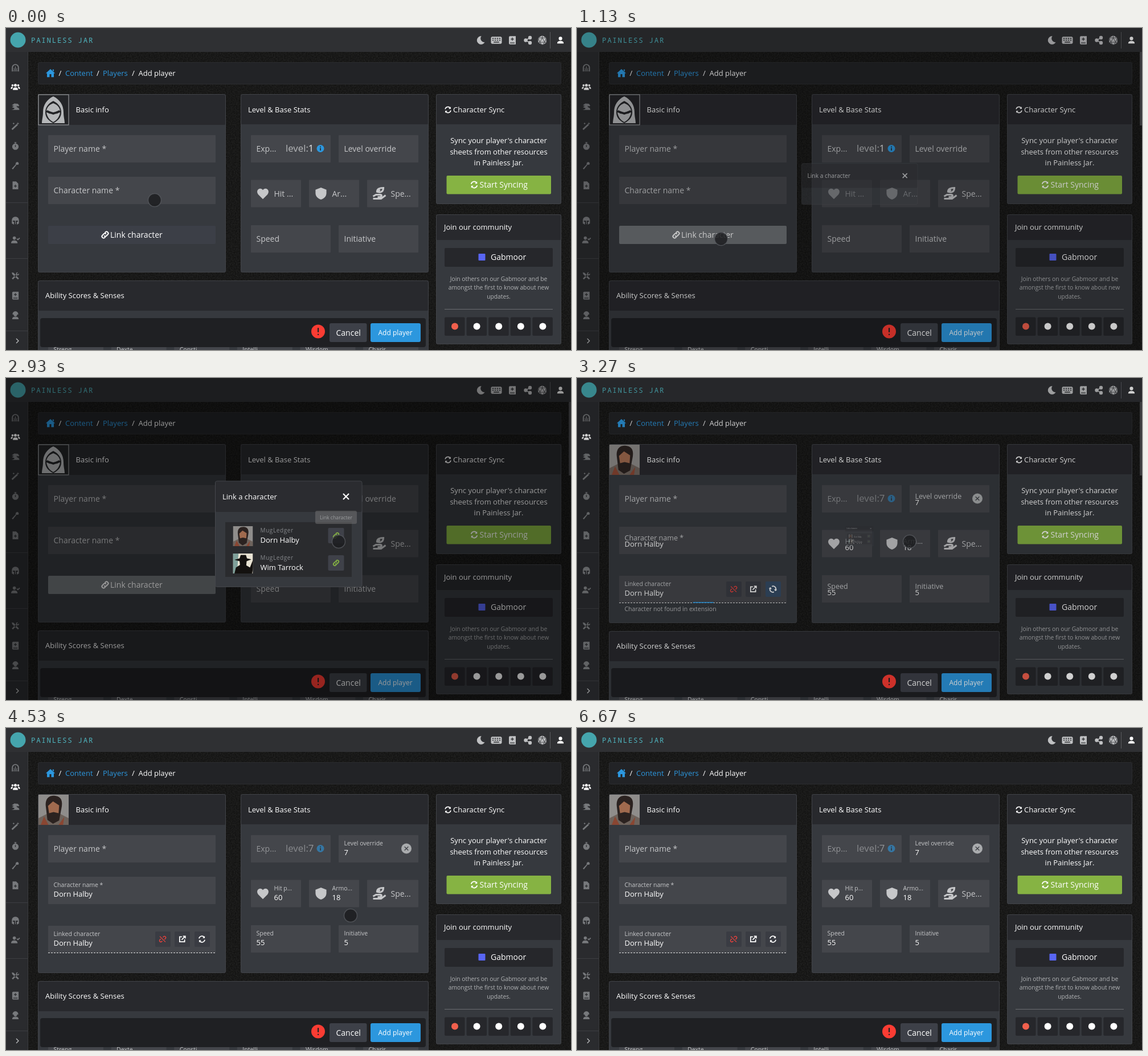
These frames come from a looping animation (992 px wide and 565 px high, 7.54 s). An HTML page:

```html
<!DOCTYPE html>
<html lang="en">
<head>
<meta charset="utf-8">
<title>Add player</title>
<style>
html, body { margin: 0; height: 100%; overflow: hidden; background: #191a19; }
svg { display: block; width: 100vw; height: 100vh; font-family: "Open Sans", sans-serif; }
text { white-space: pre; }
</style>
</head>
<body>
<svg id="stage" viewBox="0 0 992 565"></svg>
<script>
const LOOP = 7540, OPEN = 1050, LOADED = 1190, LINKED = 3110;
const BLUE = '#2c97de', SOFT = '#c6c7c9', PANEL = '#36393e', HEAD = '#28292d', FIELD = '#44464b', DARK = '#26272b';
const HERO = 'Dorn Halby', RIVAL = 'Wim Tarrock', SITE = 'MugLedger';

const box = (x, y, w, h, fill, r = 0, more = '') =>
  `<rect x="${x}" y="${y}" width="${w}" height="${h}" rx="${r}" fill="${fill}" ${more}/>`;
const dot = (x, y, r, fill) => `<circle cx="${x}" cy="${y}" r="${r}" fill="${fill}"/>`;
const text = (x, y, s, size = 13, fill = '#fff', more = '') =>
  `<text x="${x}" y="${y}" font-size="${size}" fill="${fill}" ${more}>${s}</text>`;
const mid = (x, y, s, size, fill) => text(x, y, s, size, fill, 'text-anchor="middle"');
const line = (x1, y1, x2, y2, color, more = '') =>
  `<path d="M${x1} ${y1}L${x2} ${y2}" stroke="${color}" ${more}/>`;

// Icons live on a 24 unit grid; names in STROKED hold the pen width.
const ICON = {
  home: 'M10 21v-7h4v7h6v-9h3L12 2 1 12h3v9zM17 3h3v5l-3-3z',
  link: 'M9 14a4.500 4.500 0 0 0 7 1l4-4a4.700 4.700 0 0 0-7-7l-2 2M15 10a4.500 4.500 0 0 0-7-1l-4 4a4.700 4.700 0 0 0 7 7l2-2',
  unlink: 'M13 6l2-2a4 4 0 0 1 6 6l-3 3M11 18l-2 2a4 4 0 0 1-6-6l3-3M3 3l18 18',
  sync: 'M3 10a9 9 0 0 1 16-4M21 14a9 9 0 0 1-16 4M21 2v7h-7zM3 22v-7h7z',
  open: 'M11 5H4v15h15v-7M14 3h7v7M20 4L10 14',
  heart: 'M12 22L3 13C-1 8 2 2 7 2c2 0 4 1 5 3 1-2 3-3 5-3 5 0 8 6 4 11z',
  shield: 'M12 1L2 5v6c0 6 4 10 10 12 6-2 10-6 10-12V5z',
  hand: 'M1 21h14l8-6M1 17l5-3h8c3 0 2 4-1 4H9M8 9c0-5 4-7 11-7 0 6-4 9-10 7l4-4',
  moon: 'M13 1a11 11 0 1 0 9 16A10 10 0 0 1 13 1z',
  keys: 'M2 4h20l2 2v12l-2 2H2l-2-2V6zM3 7v2h3V7zM8 7v2h3V7zM13 7v2h3V7zM18 7v2h3V7zM3 11v2h3v-2zM8 11v2h3v-2zM13 11v2h3v-2zM18 11v2h3v-2zM6 15v2h12v-2z',
  book: 'M6 1h15v22H6a3 3 0 0 1-3-3V4a3 3 0 0 1 3-3zM6 18v2h12v-2zM11 5v3H8v2h3v3h2v-3h3V8h-3V5z',
  share: 'M18 5L6 12l12 7',
  die: 'M12 0l10 6v12l-10 6L2 18V6z',
  dieEdges: 'M12 0v6L2 6l4 11L12 6l6 11H6L2 18l10 6-6-7m16 1l-4-1-6 7m6-7l4-11L12 6',
  user: 'M12 12a5.500 5.500 0 1 0 0-11 5.500 5.500 0 0 0 0 11zM2 22c0-6 4-8 10-8s10 2 10 8z',
  users: 'M12 12a4 4 0 1 0 0-8 4 4 0 0 0 0 8zM5 21c0-6 3-7 7-7s7 1 7 7zM4 11a3 3 0 1 0 0-6 3 3 0 0 0 0 6zM-1 18c0-5 2-6 6-6l-2 6zM20 11a3 3 0 1 0 0-6 3 3 0 0 0 0 6zM25 18c0-5-2-6-6-6l2 6z',
  gate: 'M2 22V11a10 10 0 0 1 20 0v11h-3V11a7 7 0 0 0-14 0v11zM7 22v-9h2v9zM15 22v-9h2v9zM11 22V8h2v14zM7 15h10v2H7z',
  dragon: 'M2 8l7-5 10 1 4 5-3 2-5-1 2 4c4 1 6 3 6 7H1c5-1 9-2 8-5L2 13l6-3z',
  wand: 'M1 20L16 6l3 3L4 23zM19 1l1 3 3 1-3 1-1 3-1-3-3-1 3-1zM7 2l1 2 2 1-2 1-1 2-1-2-2-1 2-1z',
  watch: 'M9 1h6v2h-2v2a9 9 0 1 1-2 0V3H9zM11 9v6h2V9z',
  staff: 'M2 21L13 9c-2-5 5-9 8-4 2 5-4 7-5 4L5 23z',
  file: 'M4 1h10l6 6v16H4zM11 10v3H8v2h3v3h2v-3h3v-2h-3v-3z',
  helm: 'M12 1c6 0 10 4 10 10v9l-6 3v-8h3v-3h-6v10h-2V12H5v3h3v8l-6-3v-9C2 5 6 1 12 1z',
  check: 'M9 11a4.500 4.500 0 1 0 0-9 4.500 4.500 0 0 0 0 9zM0 21c0-6 4-8 9-8s9 2 9 8zM15 9l2-2 2 2 4-4 2 2-6 6z',
  tools: 'M2 2l5 1 15 16-3 3L3 7zM22 5l-4 3-2-2 3-4c-4-1-6 2-5 5L2 19l3 3L17 10c3 1 6-1 5-5z',
  helper: 'M12 1a8 8 0 0 0-8 9h3a5 5 0 0 0 10 0h3a8 8 0 0 0-8-9zM3 23c0-5 3-7 9-7s9 2 9 7z',
  next: 'M8 4l8 8-8 8',
  cross: 'M4 4l16 16M20 4L4 20'
};
const STROKED = { link: 3.4, unlink: 2.4, sync: 3, open: 3, hand: 3.2, share: 2.5, dieEdges: 1.2, next: 2.5, cross: 3.5 };
function icon(name, x, y, size, color, more = '') {
  const pen = STROKED[name];
  const paint = pen ? `fill="${name === 'sync' ? color : 'none'}" stroke="${color}" stroke-width="${pen}"` : `fill="${color}" fill-rule="evenodd"`;
  if (name === 'sync') {
    const [a, b, c, d] = ICON.sync.split(/(?=M)/);
    return `<g transform="translate(${x} ${y}) scale(${size / 24})"><g ${more}><g transform="translate(-12 -12)">` +
      `<path d="${a}${b}" fill="none" stroke="${color}" stroke-width="3"/><path d="${c}${d}" fill="${color}"/></g></g></g>`;
  }
  return `<path d="${ICON[name]}" ${paint} transform="translate(${x} ${y}) scale(${size / 24}) translate(-12 -12)" ${more}/>`;
}

const panel = (x, y, w, h, head) =>
  box(x, y, w, h, PANEL, 3) + box(x, y, w, head, HEAD, 3) +
  box(x + .5, y + .5, w - 1, h - 1, 'none', 3, 'stroke="#414348"');

// Portraits on a 54 unit square, flat and faceless.
const portrait = (x, y, size, art) => `<svg x="${x}" y="${y}" width="${size}" height="${size}" viewBox="0 0 54 54">${art}</svg>`;
const bearded = box(0, 0, 54, 54, '#8f8d8b') +
  '<path d="M0 54V42l16-8h22l16 8v12z" fill="#6e635c"/><path d="M4 54l6-15 8 15zM44 54l2-14-10 14z" fill="#8a4632"/>' +
  '<path d="M13 20C12 4 22 1 30 2c11 1 14 10 11 23l-4 21-11 6-10-7z" fill="#2b2220"/>' +
  '<path d="M17 20l9-8 11 7-1 14-9-2-8 2z" fill="#a06a4e"/>';
const hatted = box(0, 0, 54, 54, '#e9e3d3') + '<path d="M0 0h15l-4 54H0z" fill="#7fa09a"/>' +
  '<path d="M4 17l14-4 3-9h14l3 9 12 3-13 5-1 11 10 6 8-20 3 2-5 34H4l4-16 11-7-1-10z" fill="#14110f"/>';
const hood = box(57, 117, 53, 53, '#232427', 0, 'stroke="#a9abae"') +
  '<path d="M83 120c-11 5-18 15-18 28 0 8-2 13-2 19h40c0-6-2-11-2-19 0-13-7-23-18-28z" fill="#b5b7b9"/>' +
  '<path d="M83 128c-10 5-14 12-14 20 0 9 6 15 14 19 8-4 14-10 14-19 0-8-4-15-14-20z" fill="#232427"/>' +
  '<path d="M83 132c-8 3-11 8-12 13l12 3 12-3c-1-5-4-10-12-13zM71 148c1 8 6 14 12 17 6-3 11-9 12-17l-12 4z" fill="#b5b7b9"/>' +
  '<path d="M72 144l9 4c-2 4-8 3-9-4zM94 144l-9 4c2 4 8 3 9-4z" fill="#232427"/>';

function field(x, y, w, label, value, pad = 10) {
  const at = x + pad - .5;
  return box(x, y, w, 48, FIELD, 1) + (value
    ? `<text class="label" x="${at}" data-top="${y}" data-s="${label}" fill="${SOFT}"></text>` + text(at, y + 35, value)
    : text(at, y + 29, label, 14, SOFT));
}

function form(done) {
  const v = s => done ? s : '';
  const level = `<g opacity="${done ? .6 : 1}">` + text(439.5, 217, 'Exp...', 14, SOFT) +
    text(491, 217, `level:<tspan fill="${done ? SOFT : '#e8e8e8'}">${done ? 7 : 1}</tspan>`, 16.800, '#b5b7b9') +
    dot(552, 211.5, 6.5, BLUE) + box(551.2, 210.5, 1.700, 4.500, HEAD) + box(551.2, 207.6, 1.700, 1.700, HEAD) + '</g>';
  const linkRow = done
    ? box(74, 347, 294, 47, FIELD, 1) + line(74, 394.500, 368, 394.5, '#e4e4e4', 'stroke-dasharray="3 2"') +
      text(83.5, 365, 'Linked character', 10.600, SOFT) + text(83.5, 382, HERO) +
      [262, 296, 331].map((x, i) => box(x, 357, 27, 27, '#3a3c43', 2, i > 1 ? 'id="refresh"' : '')).join('') +
      icon('unlink', 275, 370.5, 13, '#f0423c') + icon('open', 309.5, 370.5, 14, '#fff') +
      icon('sync', 344, 370.5, 13.500, '#fff', 'id="spin"') +
      box(74, 393, 36, 1.700, BLUE, 0, 'id="bar"') +
      text(83.5, 409, 'Character not found in extension', 10.5, '#b9babc', 'id="note"')
    : box(74, 347, 294, 32, '#3c3f47', 2, 'id="linkBtn"') + icon('link', 174, 363, 14, '#fff') + text(183, 368, 'Link character', 14);
  const stats = ['Speed', 'Initiative'].map((s, i) => field(430 + 154 * i, 346, 140, s, v(i ? '5' : '55'))).join('');
  const abilities = ['Streng...', 'Dexte...', 'Consti...', 'Intelli...', 'Wisdom', 'Charis...']
    .map((s, i) => box(74 + 110.600 * i, 556, 97, 20, FIELD) + text(83.5 + 110.6 * i, 567.5, s, 10.5, SOFT)).join('');
  return panel(56, 116, 330, 313 + done, 54) + (done ? portrait(57, 117, 53, bearded) : hood) + text(122.5, 148, 'Basic info') +
    field(74, 188, 294, 'Player name *') + field(74, 261, 294, 'Character name *', v(HERO)) + linkRow +
    panel(412, 116, 330, 313 + done, 53) + text(425, 148, 'Level &amp; Base Stats') +
    box(430, 188, 140, 48, FIELD, 1) + level + field(584, 188, 140, 'Level override', v('7')) +
    (done ? dot(703, 211.5, 9, '#a9abad') + icon('cross', 703, 211.5, 10, FIELD) : '') +
    field(430, 266.5, 88, 'Hit ...', v('60'), 41) + icon('heart', 451, 291, 22, SOFT) +
    field(532, 266.5, 88, 'Ar...', v('18'), 41) + icon('shield', 553, 290.5, 23, SOFT) +
    field(634, 266.5, 90, 'Spe...', '', 42) + icon('hand', 655.5, 290.5, 24, SOFT) + stats +
    panel(56, 443 + done, 686, 140, 53) + text(69, 474 + done, 'Ability Scores &amp; Senses') + abilities;
}

const sidebar = box(0, 42, 38, 523, '#2a2b2e') + line(38.5, 42, 38.5, 565, '#3a3b3e') +
  [306.500, 404.5, 531.5].map(y => line(0, y, 38, y, '#3d3e42')).join('') +
  Object.entries({ gate: 70, users: 103, dragon: 138, wand: 172, watch: 207, staff: 241, file: 276, helm: 338,
    check: 372, tools: 435, book: 469.5, helper: 504, next: 549 })
    .map(([name, y]) => icon(name, name === 'next' ? 20 : 16.5, y, name === 'next' ? 12 : 15, { users: '#fff', next: '#c0c1c3' }[name] || '#77797c')).join('');

const topBar = box(0, 0, 992, 42, '#2f3033') + dot(21, 21, 13.500, '#45a5ad') +
  text(44, 25.5, 'PAINLESS JAR', 12.5, '#4fb3bd', `style="font-family:'Noto Sans Mono',monospace;letter-spacing:1.680px"`) +
  Object.entries({ moon: 834, keys: 861, book: 889 }).map(([n, x]) => icon(n, x, 21.5, n === 'keys' ? 19 : 16, '#c0c1c3')).join('') +
  icon('share', 916, 21.5, 14, '#c0c1c3') + dot(920, 17, 3.200, '#c0c1c3') + dot(920, 26, 3.2, '#c0c1c3') + dot(912.5, 21.5, 3.2, '#c0c1c3') +
  icon('die', 941.5, 21.5, 17, '#c0c1c3') + icon('dieEdges', 941.5, 21.5, 17, '#2f3033') +
  line(955.5, 7, 955.5, 36, '#5a5b5f') + icon('user', 973.5, 21.5, 13.5, '#fff');

const crumbs = box(56.5, 60.5, 918, 38, '#222326', 2, 'stroke="#2b2c2f"') + icon('home', 78, 79.5, 18, BLUE) +
  [92.5, 159, 221].map(x => text(x, 84, '/')).join('') +
  text(104, 84, 'Content', 13, BLUE) + text(170, 84, 'Players', 13, BLUE) + text(232.5, 84, 'Add player');

const aside = panel(755, 116, 220, 193, 53) + icon('sync', 776, 143.5, 13, '#fff') + text(785, 148, 'Character Sync') +
  ["Sync your player's character", 'sheets from other resources', 'in Painless Jar.'].map((s, i) => mid(865, 202 + 19.5 * i, s, 13, '#fff')).join('') +
  box(773.5, 259, 183.5, 32.5, '#86b343', 2) + icon('sync', 822, 275, 14, '#fff') + text(831.5, 280, 'Start Syncing', 14) +
  panel(755, 327, 220, 228, 45) + text(769, 354, 'Join our community') +
  box(770, 386, 190, 33, DARK, 2) + box(829.5, 396, 12, 12, '#5865f2', 1) + text(851, 407, 'Gabmoor', 14) +
  ['Join others on our Gabmoor and be', 'amongst the first to know about new', 'updates.'].map((s, i) => mid(865, 443.5 + 15.5 * i, s, 10.300, '#b2b4b6')).join('') +
  line(770, 493.5, 960, 493.5, '#6b6d71') +
  [0, 1, 2, 3, 4].map(i => box(770 + 38.600 * i, 507.5, 35.5, 32.5, DARK, 2) + dot(788 + 38.6 * i, 523.5, 6, i ? '#fff' : '#f1604d')).join('');

const footer = box(60, 509, 677, 51, '#1f2023', 4) + dot(548, 532.5, 12, '#fb3c33') +
  box(547, 526, 2.200, 8, '#1f2023', 1) + box(547, 536.5, 2.200, 2.4, '#1f2023', 1) +
  box(568, 518, 65.5, 33, '#3d4048', 3) + text(579.5, 540, 'Cancel', 14) +
  box(640, 518, 88, 33, BLUE, 3) + text(653.5, 539, 'Add player', 12);

const row = (y, name, art) => portrait(398.5, y + 7, 35, art) +
  text(446.5, y + 18, SITE, 10, '#85878b', 'letter-spacing=".6"') + text(446.5, y + 36.5, name) +
  box(565.5, y + 10, 28, 27, '#3f4149', 2) + icon('link', 579.5, y + 23.5, 12, '#86b343');
const modal = box(367.5, 181, 257.5, 185.5, PANEL, 3, 'id="sheet" stroke="#45474c"') + box(368, 181.5, 256.5, 53.5, '#2b2c30', 2) +
  text(380, 213, 'Link a character') + icon('cross', 597, 208, 15, '#fff') +
  `<g id="list">${box(385, 253, 222, 96, '#2a2b2e') + row(253, HERO, bearded) + row(301, RIVAL, hatted)}</g>`;

const $ = id => document.getElementById(id);
$('stage').innerHTML = `<filter id="grain" x="0" y="0" width="1" height="1" color-interpolation-filters="sRGB">
  <feTurbulence type="fractalNoise" baseFrequency=".45" numOctaves="2" seed="4"/>
  <feColorMatrix values=".1 0 0 0 .048 .1 0 0 0 .048 .1 0 0 0 .045 0 0 0 0 1"/></filter>` +
  box(0, 0, 992, 565, '#191a19', 0, 'filter="url(#grain)"') + crumbs +
  `<g id="before">${form(0)}</g><g id="after">${form(1)}</g>` + aside + footer + sidebar + topBar +
  box(988, 42, 4, 129, '#47484b', 0, 'id="thumb"') + box(0, 0, 992, 565, '#000', 0, 'id="shade"') +
  `<g id="modal">${modal}</g>` +
  `<g id="tip">${box(543, 233, 73, 23, '#757575', 3) + mid(579.5, 247.5, 'Link character', 8.700, '#fff')}</g>` +
  '<circle id="cursor" r="11.5" fill="#1c1d20" fill-opacity=".85" stroke="#5a5c61" stroke-opacity=".75" stroke-width="1.5"/>';
const labels = [...document.querySelectorAll('.label')];

// Pointer stops: time, x, y.
const PATH = [[0, 261, 302], [340, 261, 302], [730, 253, 370], [1470, 253, 370], [1670, 324, 378], [1880, 500, 357],
  [2060, 626, 318], [2270, 596, 290], [2730, 584, 287], [3670, 584, 287], [4500, 605, 329], [6210, 605, 329],
  [6670, 236, 579], [LOOP, 236, 579]];

const ramp = (t, start, length) => Math.min(1, Math.max(0, (t - start) / length));
const mix = (a, b, p) => a + (b - a) * p;

function slope(i, k) {
  const a = PATH[i - 1], b = PATH[i], c = PATH[i + 1];
  if (!a || !c || (b[k] - a[k]) * (c[k] - b[k]) <= 0) return 0;
  return (c[k] - a[k]) / (c[0] - a[0]);
}
function pointer(t, k) {
  const i = PATH.findIndex(p => p[0] > t) - 1, a = PATH[i], b = PATH[i + 1];
  const span = b[0] - a[0], p = (t - a[0]) / span, q = 1 - p;
  return a[k] * q * q * (1 + 2 * p) + b[k] * p * p * (3 - 2 * p) +
    span * p * q * (slope(i, k) * q - slope(i + 1, k) * p);
}

function set(id, attrs) {
  for (const name in attrs) $(id).setAttribute(name, attrs[name]);
}
const show = (id, on) => set(id, { display: on ? 'inline' : 'none' });

function draw(now) {
  const t = now % LOOP, done = t >= LINKED;
  show('before', !done);
  show('after', done);
  show('thumb', t >= OPEN && t < 3730);
  set('linkBtn', { fill: t < OPEN ? '#3c3f47' : '#6e7276' });

  const enter = ramp(t, OPEN, 200), leave = ramp(t, LINKED, 200);
  const fade = Math.min(1, 1.3 * enter);
  const scale = done ? 1 - leave : 1 - (1 - enter) ** 3;
  const height = t < LOADED ? 91 : 185.5;
  set('shade', { opacity: .4 * fade * (1 - ramp(t, LINKED, 300)) });
  show('modal', scale > 0);
  set('modal', {
    opacity: done ? 1 - .75 * leave : fade,
    transform: `translate(496 ${273.7 + 4 * leave}) scale(${scale}) translate(-496 ${-181 - height / 2})`
  });
  set('sheet', { height });
  show('list', t >= LOADED);
  set('tip', { opacity: done ? 0 : ramp(t, 2880, 100) });

  const p = ramp(t, LINKED, 360), lift = p * p * (3 - 2 * p);
  for (const el of labels) {
    const s = el.dataset.s, top = +el.dataset.top;
    el.textContent = s === 'Ar...' ? (lift < .7 ? 'Arm...' : 'Armo...') : s === 'Hit ...' && lift > .7 ? 'Hit p...' : s;
    el.setAttribute('y', mix(top + 29, top + 18, lift));
    el.setAttribute('font-size', mix(14, 10.5, lift));
  }

  const x = Math.min(368, 74 + Math.max(0, t - LINKED) * .806);
  set('bar', { x, width: Math.min(36, 368 - x) });
  set('note', { opacity: 1 - ramp(t, 3560, 100) });
  set('refresh', { fill: t < 3660 ? '#354c66' : '#3a3c43' });
  set('spin', { transform: `rotate(${360 * ramp(t, LINKED, 1000)})` });
  set('cursor', { cx: pointer(t, 1), cy: pointer(t, 2) });
  requestAnimationFrame(draw);
}
requestAnimationFrame(draw);
</script>
</body>
</html>
```
